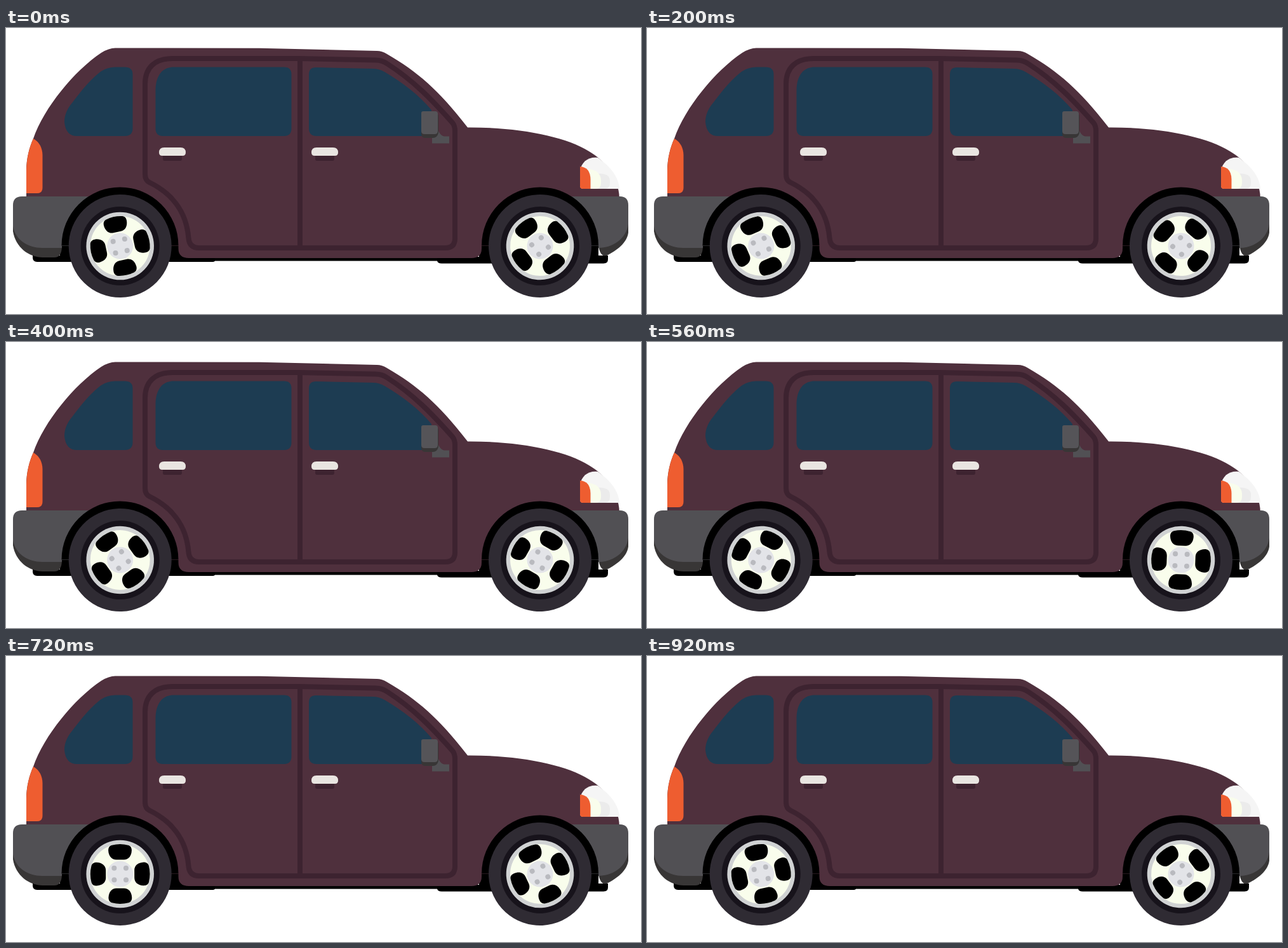
An HTML page for the animation above (960 ms loop, 1000 px wide and 450 px high).

```html
<!DOCTYPE html>
<html lang="en">
<head>
<meta charset="utf-8">
<title>Car with turning wheels</title>
<style>
  html, body { margin: 0; height: 100%; overflow: hidden; background: #fff; }
  svg { display: block; width: 100%; height: 100%; }
</style>
</head>
<body>
<svg viewBox="0 0 1000 450">
  <defs>
    <path id="slot" d="M-13-45.2Q0-48.6 13-45.2C17-44 18.4-41 18.4-37C18-28 13-22.5 6-22.5H-6C-13-22.5-18-28-18.4-37C-18.4-41-17-44-13-45.2Z"/>
    <g id="spoke">
      <use href="#slot"/>
      <circle cx="9.3" cy="-9.3" r="4" fill="#b9babf"/>
    </g>
    <g id="wheel">
      <circle r="81" fill="#2f2b33"/>
      <circle r="62" fill="#17131b"/>
      <circle r="53.3" fill="#d0d2d3"/>
      <circle r="47" fill="#f9fdec"/>
      <circle r="20.5" fill="#e3e4e8"/>
      <use href="#spoke"/>
      <use href="#spoke" transform="rotate(90)"/>
      <use href="#spoke" transform="rotate(180)"/>
      <use href="#spoke" transform="rotate(270)"/>
    </g>
    <path id="arch" d="M-92 0A92 92 0 0 1 92 0Z"/>
    <g id="handle">
      <path d="M6 13H36V18Q36 21 33 21H9Q6 21 6 18Z" fill="#3d2330"/>
      <path d="M0 8Q0 0 8 0H34Q42 0 42 8Q42 13 37 13H5Q0 13 0 8Z" fill="#e9e5e1"/>
    </g>
  </defs>

  <!-- underside -->
  <path d="M42 358H85V340H290V360H745V340H933V358H948V364Q948 370.5 941 370.5H686Q680 370.5 679 366.5H329Q328 368 324 368H49Q42 368 42 361Z"/>

  <!-- body -->
  <path fill="#4f303d" d="M172 31.5L400 31.8L584 36Q592 36 600 41C648 69 680 96 727 156.5C805 156 880 170 918 194C948 212 965 238 966 268H841V343H749V347Q749 362 733 362H288Q271.5 362 271.5 347V343H180V268H32V225C32 205 37 187 43 174C60 125 108 67 150 39Q162 31.5 172 31.5Z"/>

  <!-- door seams -->
  <g fill="none" stroke="#3d2330" stroke-width="8">
    <path d="M219 88C219 62 235 48 262 48H460L582 50.5Q592 50.5 600 56C642 83 670 112 703 149Q707 154 707 162V331Q707 346 692 346H304Q289 346 287.5 331C284 285 257 258 226 243Q219 240 219 230Z"/>
    <path d="M463 49V345"/>
  </g>

  <!-- windows -->
  <g fill="#1d3c52">
    <path d="M92 148C92 135 98 125 104 118C125 90 139 76 150 68Q160 61.5 172 61.5H187Q199.500 61.5 199.500 73V158Q199.500 170 187 170H112Q94 170 92 148Z"/>
    <path d="M235.500 97C236 75 246 61.5 264 61.5H438Q449.500 61.5 449.500 73V158Q449.500 170 438 170H247Q235.500 170 235.500 158Z"/>
    <path d="M477 73Q477 62 488 62L578 64Q587 64 596 69C625 86 650 105 670 129V170H489Q477 170 477 158Z"/>
  </g>

  <!-- mirror -->
  <path fill="#515054" d="M671 170V181.500H698V170.500H690Q684 169 681 162Z"/>
  <path fill="#383636" d="M654 135H678Q681 135 681 139V165Q679 173 672 173H660Q654 173 654 166Z"/>
  <path fill="#555458" d="M654 134Q654 131 657 131H676Q680 131 680 135V162Q680 167 675 167H659Q654 167 654 162Z"/>

  <use href="#handle" x="241" y="188"/>
  <use href="#handle" x="481" y="188"/>

  <!-- lights -->
  <path fill="#ee5d30" d="M43 174Q57 182 57.5 200V251Q57.500 260 49 260H32V225C32 205 37 187 43 174Z"/>
  <path fill="#f5f5f5" d="M904 250V225C906 210 918 202 932 204C952 218 965 235 966 253H907Z"/>
  <path fill="#ebebeb" d="M933 229Q951 229 951 240V244Q951 253 942 253H925Z"/>
  <path fill="#f9fdec" d="M915 222C930 222 937 230 937 240V244Q937 253 928 253H915Z"/>
  <path fill="#ee5d30" d="M904 218Q920 219 920.500 238V253H908Q904 253 904 249Z"/>

  <!-- bumpers -->
  <path fill="#383636" d="M11 310V320C15 345 36 361 58 361H76Q88 361 88 343Z"/>
  <path fill="#515054" d="M25 265H180V343H88V346H57C35 346 15 334 11 312V279Q11 265 25 265Z"/>
  <path fill="#383636" d="M980 305V322C978 338 962 350 946 358Q936 361 933 343Z"/>
  <path fill="#515054" d="M967 265H841V343H933V346C955 346 977 332 980 308V279Q980 265 967 265Z"/>

  <use href="#arch" x="179.500" y="342.500"/>
  <use href="#arch" x="841" y="342.500"/>
  <g id="rear"></g>
  <g id="front"></g>
</svg>
<script>
const STEP = 40, LOOP = 960, TURN = 360 / 23;
const wheels = [
  { id: 'rear', x: 179.7, start: -12 },
  { id: 'front', x: 841, start: -37 }
];
for (const w of wheels) {
  w.el = document.getElementById(w.id);
  w.el.innerHTML = '<use href="#wheel"/>';
}

function draw(now) {
  const angle = Math.floor(now % LOOP / STEP) * TURN;
  for (const w of wheels) {
    w.el.setAttribute('transform', `translate(${w.x} 343) rotate(${w.start + angle})`);
  }
}

const begin = performance.now();
function tick() {
  draw(performance.now() - begin);
  requestAnimationFrame(tick);
}
tick();
</script>
</body>
</html>
```
